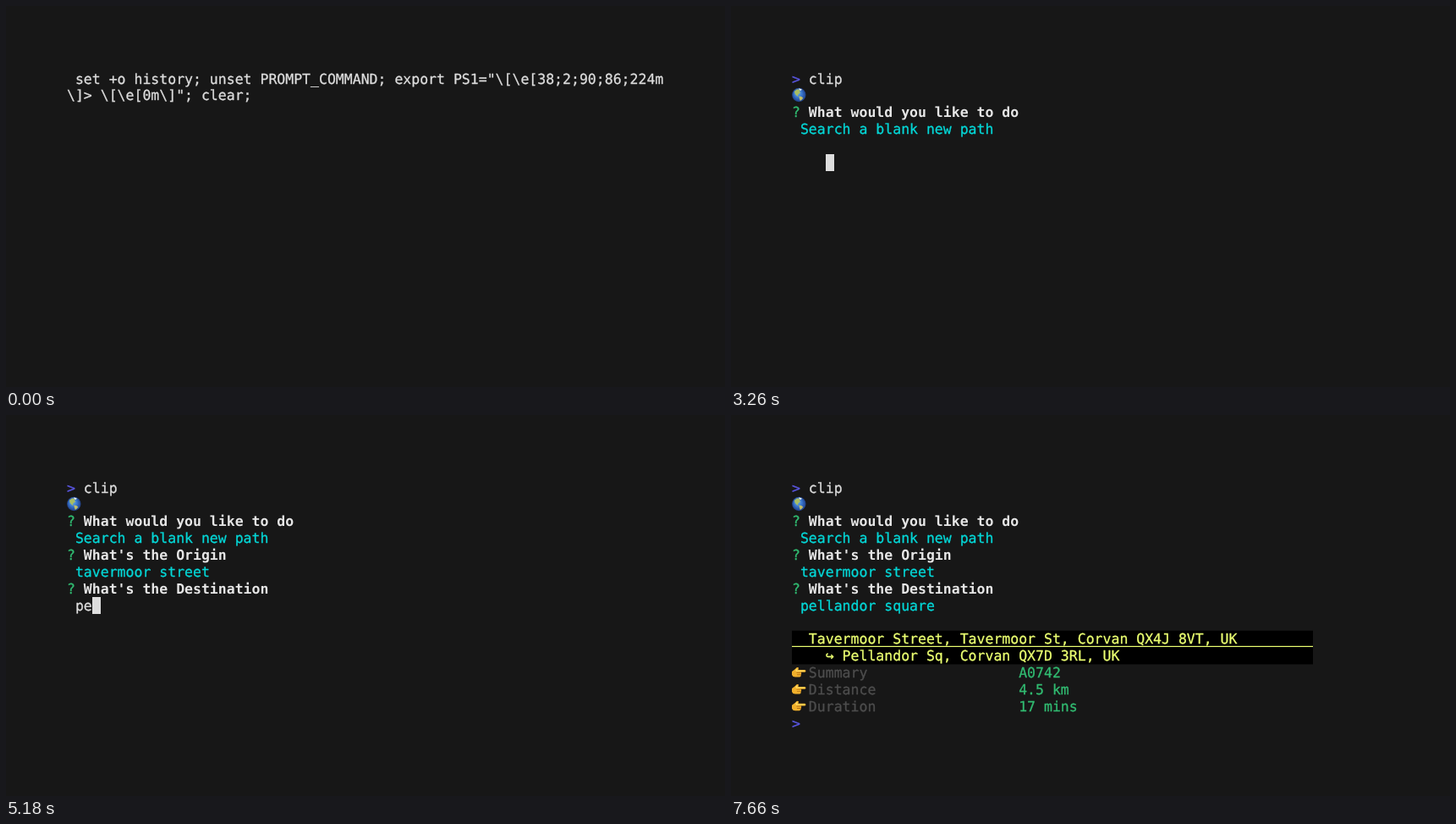
An HTML page with a canvas that plays this animation: 850x450 px, repeating every 8 s.

```html
<!DOCTYPE html>
<html lang="en">
<head>
<meta charset="utf-8">
<title>Terminal route search</title>
<style>
  html, body { margin: 0; width: 100%; height: 100%; overflow: hidden; background: #171717; }
  canvas { display: block; }
</style>
</head>
<body>
<canvas id="stage" width="850" height="450"></canvas>
<script>
const ctx = document.getElementById('stage').getContext('2d');
const LOOP = 8000, LEFT = 72, TOP = 75.5, CELL = 9.933, LINE = 19.87;
const FG = '#dddddd', BOLD = '#e6e6e6', GREEN = '#31bb71', CYAN = '#04d7d7', YELLOW = '#ebff71',
      VIOLET = '#5a56e0', DIM = '#757575', GRAY = '#4d4d4d';
const ORIGIN = 'tavermoor street', DESTINATION = 'pellandor square';

ctx.textRendering = 'geometricPrecision';
ctx.lineWidth = 0.3;
ctx.lineJoin = 'round';

const colX = col => LEFT + col * CELL;
const rowY = row => TOP + row * LINE;

// A hairline outline gives the regular weight its slightly heavier look.
function text(row, col, string, color = FG, weight = 'normal') {
  ctx.font = `${weight} 16.5px "DejaVu Sans Mono", monospace`;
  ctx.fillStyle = ctx.strokeStyle = color;
  [...string].forEach((char, i) => {
    const x = colX(col + i), y = rowY(row) + 16;
    ctx.fillText(char, x, y);
    if (weight === 'normal') ctx.strokeText(char, x, y);
  });
}

function cursor(row, col) {
  ctx.fillStyle = FG;
  ctx.fillRect(Math.round(colX(col)), Math.round(rowY(row)), 10, 20);
}

function question(row, string) {
  text(row, 0, '?', GREEN);
  text(row, 2, string, BOLD, 'bold');
}

function shape(color, path) {
  ctx.fillStyle = color;
  ctx.fill(new Path2D(path));
}

function globe(row) {
  ctx.save();
  ctx.translate(80.3, rowY(row) + 9.6);
  const sea = ctx.createRadialGradient(-2, -3, 1, 0, 0, 8.3);
  sea.addColorStop(0, '#68aeea');
  sea.addColorStop(0.55, '#3670c8');
  sea.addColorStop(1, '#203f86');
  shape(sea, 'M-8.2 0a8.2 8.2 0 1 0 16.4 0a8.2 8.2 0 1 0 -16.4 0');
  shape('#a9bd62', 'M-5.5-4L-2-6.8L1.5-5.5L.5-4L2-3L-.5-1L-1.5 1L0 2L-2 1.6L-4.5-1Z');
  shape('#c0bd68', 'M0 1.5L3 2L5 3.8L3 6L1.5 7L.5 4Z');
  shape('#edf2ee', 'M0-7.6L3.6-6.4L2.2-5L.2-6Z');
  ctx.restore();
}

function hand(row) {
  ctx.save();
  ctx.translate(LEFT, rowY(row) + 10);
  shape('#f0b02c', 'M0-1L4-4Q6-7 8-5.5L7.5-3H15.5Q17.5-1.6 15.5-.2H10.5Q12 1 10.8 2.5Q11 5 9 5.5H4Q1 5.5 0 3Z');
  shape('#ffd75e', 'M4-3Q6-6 7-4L6-2.4H15Q16.3-1.7 15-1.1H5Z');
  shape('#b87416', 'M5.5-.2H10.5V.6H5.5ZM6 2.3H10.8V3.1H6Z');
  ctx.restore();
}

function menu(selected) {
  const items = ['Search with saved locations', 'Search a blank new path', 'Locations', '', 'Config', 'Authenticate'];
  if (!selected) text(3, 1, '(Use arrow keys)', DIM);
  items.forEach((item, i) => text(4 + i, 2, item, i === selected ? CYAN : FG));
  text(4 + selected, 0, '❯', CYAN);
  ctx.fillStyle = '#666';
  ctx.fillRect(92, 225, 139, 1);
}

// A line being typed, with the cursor after the last character.
function typing(t, row, string, start, step, showCursor = true) {
  const count = t < start ? 0 : Math.min(string.length, Math.floor((t - start) / step) + 1);
  text(row, 1, string.slice(0, count));
  if (showCursor) cursor(row, 1 + count);
}

function results() {
  ctx.fillStyle = '#000';
  ctx.fillRect(72, 254.7, 616, 39.7);
  ctx.fillStyle = YELLOW;
  ctx.fillRect(72, 272.8, 616, 1.2);
  text(9, 2, 'Tavermoor Street, Tavermoor St, Corvan QX4J 8VT, UK', YELLOW);
  text(10, 4, '↪ Pellandor Sq, Corvan QX7D 3RL, UK', YELLOW);
  [['Summary', 'A0742'], ['Distance', '4.5 km'], ['Duration', '17 mins']].forEach(([label, value], i) => {
    hand(11 + i);
    text(11 + i, 2, label, GRAY);
    text(11 + i, 27, value, GREEN);
  });
}

function draw(t) {
  ctx.fillStyle = '#171717';
  ctx.fillRect(0, 0, 850, 450);

  if (t < 40) {
    text(0, 1, 'set +o history; unset PROMPT_COMMAND; export PS1="\\[\\e[38;2;90;86;224m');
    text(1, 0, '\\]> \\[\\e[0m\\]"; clear;');
    return;
  }

  text(0, 0, '>', VIOLET);
  if (t < 580) {
    const count = Math.max(0, Math.min(4, Math.floor((t - 190) / 50) + 1));
    text(0, 2, 'clip'.slice(0, count));
    return cursor(0, 2 + count);
  }
  text(0, 2, 'clip');
  if (t < 940) return cursor(1, 0);

  globe(1);
  question(2, 'What would you like to do');
  if (t < 2840) return menu(t < 2060 ? 0 : 1);
  text(3, 1, 'Search a blank new path', CYAN);

  // The prompt line is briefly wiped during a redraw.
  if (t >= 3260 && t < 3280) return cursor(5, 4);
  question(4, "What's the Origin");
  if (t < 3940) return typing(t, 5, ORIGIN, 3120, 50);
  text(5, 1, ORIGIN, CYAN);

  question(6, "What's the Destination");
  if (t < 5920) {
    const redraw = t >= 5580 && t < 5600;
    const blinkedOff = t >= 4520 && t < 5100;
    typing(t, 7, DESTINATION, 5100, 52, !redraw && !blinkedOff);
    if (redraw) cursor(6, 0);
    return;
  }
  text(7, 1, DESTINATION, CYAN);
  if (t < 6580) return cursor(8, 0);
  if (t < 7040) return;

  results();
  if (t < 7060) return;
  text(14, 0, '>', VIOLET);
  if (t < 7660) cursor(14, 2);
}

function tick() {
  draw(performance.now() % LOOP);
  requestAnimationFrame(tick);
}
tick();
</script>
</body>
</html>
```
